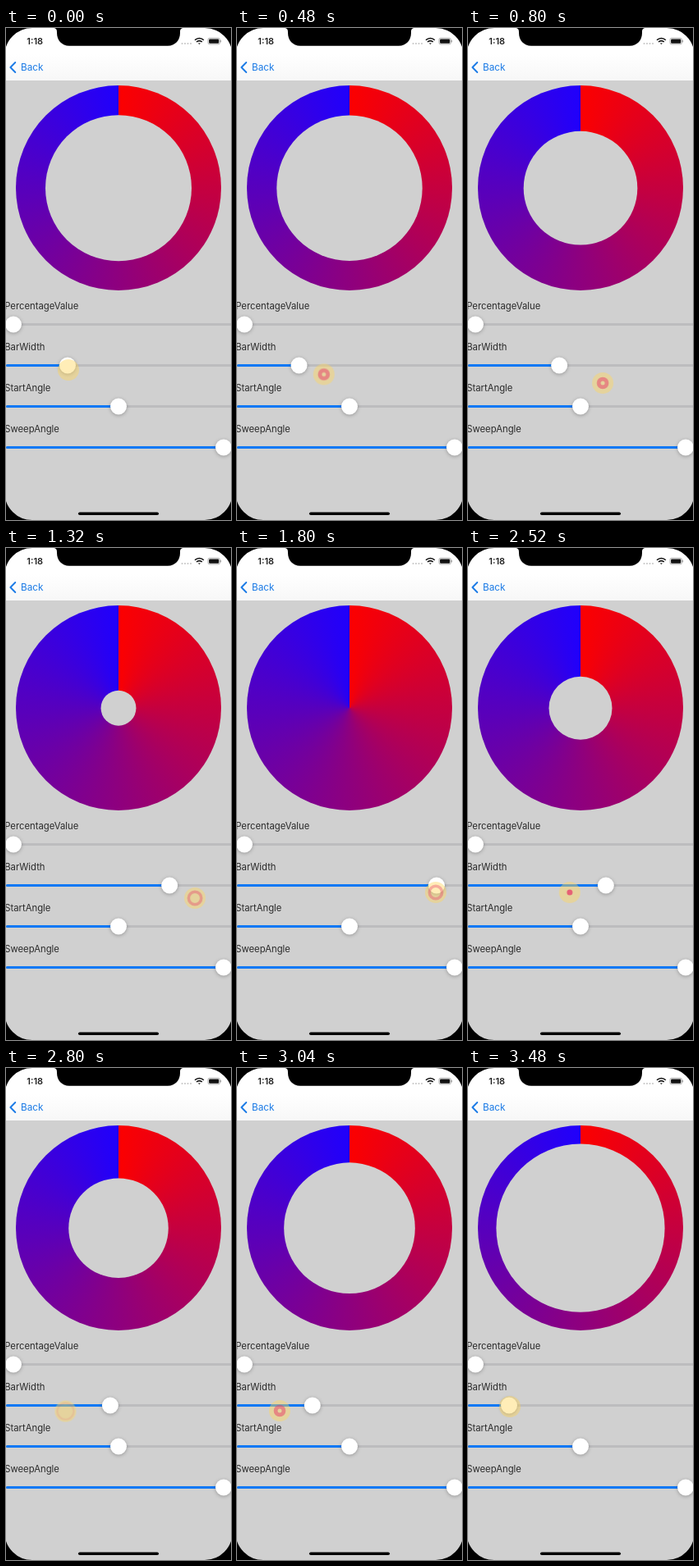
Animation, 274 px wide and 600 px high, one loop 3520 ms. Source, as an HTML page:

```html
<!DOCTYPE html>
<html lang="en">
<head>
<meta charset="utf-8">
<title>Circular gauge sliders</title>
<style>
  @property --x { syntax: "<length>"; inherits: true; initial-value: 75px; }

  html, body { margin: 0; width: 100%; height: 100%; overflow: hidden; background: #000; }
  .stage { position: relative; width: 274px; height: 600px; background: #d0d0d0; overflow: hidden; }
  .gauge {
    position: absolute; left: 12px; top: 70px; width: 250px; height: 250px;
    border-radius: 50%; background: conic-gradient(#fc0000, #2000fc);
  }
  svg { position: absolute; inset: 0; display: block; animation: drag 3.52s linear infinite; }
  text { font-family: Inter, "Open Sans", sans-serif; }

  .label { font-size: 11.3px; fill: #2a2a2a; }
  .track { fill: #bcbcbe; }
  .fill { fill: #0a78f5; }
  .thumb { fill: #fff; filter: drop-shadow(0 1.5px 2px rgb(0 0 0 / .28)); }

  .hole { fill: #d0d0d0; r: max(0px, 89px - (var(--x) - 75px) * .544); }
  .live.fill { width: var(--x); }
  .live.thumb { transform: translateX(var(--x)); }

  .touch { animation: touch 3.52s linear infinite; }
  .halo { fill: rgb(255 214 95 / .45); }
  .press { animation: press 3.52s step-end infinite; }
  .pulse { fill: none; stroke: #e63a68; animation: pulse .16s step-end infinite; }

  @keyframes drag {
    0% { --x: 75px; }
    12.5% { --x: 75px; animation-timing-function: cubic-bezier(.45, 0, .8, .7); }
    22.73% { --x: 111px; }
    37.5% { --x: 199px; animation-timing-function: cubic-bezier(.3, .55, .6, 1); }
    51.14% { --x: 243px; }
    54.5% { --x: 243px; animation-timing-function: cubic-bezier(.4, 0, .8, .76); }
    71.59% { --x: 168px; }
    86.36% { --x: 92px; animation-timing-function: cubic-bezier(.35, .45, .6, 1); }
    96.6%, 100% { --x: 50px; }
  }
  @keyframes touch {
    0% { transform: translate(76px, 417px); }
    5.68% { transform: translate(76px, 417px); animation-timing-function: cubic-bezier(.35, 0, .75, .8); }
    22.73% { transform: translate(164px, 433px); }
    37.5% { transform: translate(230px, 427px); animation-timing-function: ease-out; }
    45.45% { transform: translate(243.5px, 422px); }
    51.14% { transform: translate(242px, 420px); animation-timing-function: cubic-bezier(.3, 0, .75, .8); }
    71.59% { transform: translate(124px, 420px); animation-timing-function: cubic-bezier(.35, .45, .65, 1); }
    86.36% { transform: translate(52px, 418px); }
    98.86%, 100% { transform: translate(51px, 413px); }
  }
  @keyframes press {
    0% { visibility: hidden; }
    5.68% { visibility: visible; }
    95.45%, 100% { visibility: hidden; }
  }
  @keyframes pulse {
    0% { r: 4.9px; stroke-width: 4.8px; opacity: .5; }
    25% { r: 7.7px; stroke-width: 3.5px; opacity: .36; }
    50% { r: 10px; stroke-width: 2px; opacity: .12; }
    75%, 100% { r: 1.75px; stroke-width: 3.5px; opacity: .75; }
  }
</style>
</head>
<body>
<div class="stage">
  <div class="gauge"></div>
  <svg width="274" height="600" viewBox="0 0 274 600">
    <defs>
      <linearGradient id="bar" x2="0" y2="1">
        <stop offset=".5" stop-color="#fff"/>
        <stop offset="1" stop-color="#f7f7f7"/>
      </linearGradient>
    </defs>

    <circle class="hole" cx="137" cy="195.2"/>

    <text class="label" x="-1.8" y="343">PercentageValue</text>
    <rect class="track" y="360" width="274" height="3"/>
    <circle class="thumb" cx="9" cy="361.5" r="10"/>

    <text class="label" x="-1.8" y="393">BarWidth</text>
    <rect class="track" y="410" width="274" height="3"/>
    <rect class="fill live" y="410" height="3" rx="1.5"/>
    <circle class="thumb live" cy="411.5" r="10"/>

    <text class="label" x="-1.8" y="443">StartAngle</text>
    <rect class="track" y="460" width="274" height="3"/>
    <rect class="fill" y="460" width="137" height="3" rx="1.5"/>
    <circle class="thumb" cx="137" cy="461.5" r="10"/>

    <text class="label" x="-1.8" y="493">SweepAngle</text>
    <rect class="track" y="510" width="274" height="3"/>
    <rect class="fill" y="510" width="265" height="3" rx="1.5"/>
    <circle class="thumb" cx="265" cy="511.5" r="10"/>

    <!-- navigation and status bars -->
    <rect width="274" height="64" fill="url(#bar)"/>
    <g fill="#1c7be6">
      <path d="M11.3 42 L5.4 48 L11.3 54" fill="none" stroke="#1c7be6" stroke-width="1.9" stroke-linecap="round" stroke-linejoin="round"/>
      <text x="18" y="52.2" font-size="11.8">Back</text>
    </g>
    <text x="25.3" y="20.2" font-size="11" font-weight="600" fill="#222">1:18</text>
    <path d="M214.5 19h11" stroke="#c4c4c4" stroke-width="2" stroke-linecap="round" stroke-dasharray="0 3.5"/>
    <g fill="none" stroke="#111" stroke-width="1.6">
      <path d="M230 14.8a7.5 7.5 0 0 1 10.8 0M232 17a4.8 4.8 0 0 1 6.8 0"/>
      <path d="M233.8 18.4h3.2l-1.6 1.7z" fill="#111" stroke="none"/>
    </g>
    <rect x="245.9" y="12.3" width="14.6" height="7.6" rx="2.2" fill="none" stroke="#a0a0a0" stroke-width=".8"/>
    <rect x="247.1" y="13.5" width="12.2" height="5.2" rx="1.2" fill="#111"/>
    <path d="M261.6 14.8v2.6" stroke="#a0a0a0"/>

    <!-- device frame, slightly wider than the stage -->
    <path d="M57 0c4 0 5 1.5 5 5v1c0 9 6 15.700 15 15.700h120c9 0 15-6.700 15-15.700v-1c0-3.500 1-5 5-5z"/>
    <rect x="-21.600" y="-20" width="317.200" height="640" rx="53.600" fill="none" stroke="#000" stroke-width="40"/>
    <rect x="88" y="590.5" width="98" height="3.6" rx="1.8"/>

    <g class="touch">
      <circle class="halo" r="13"/>
      <g class="press"><circle class="pulse"/></g>
    </g>
  </svg>
</div>
</body>
</html>
```
